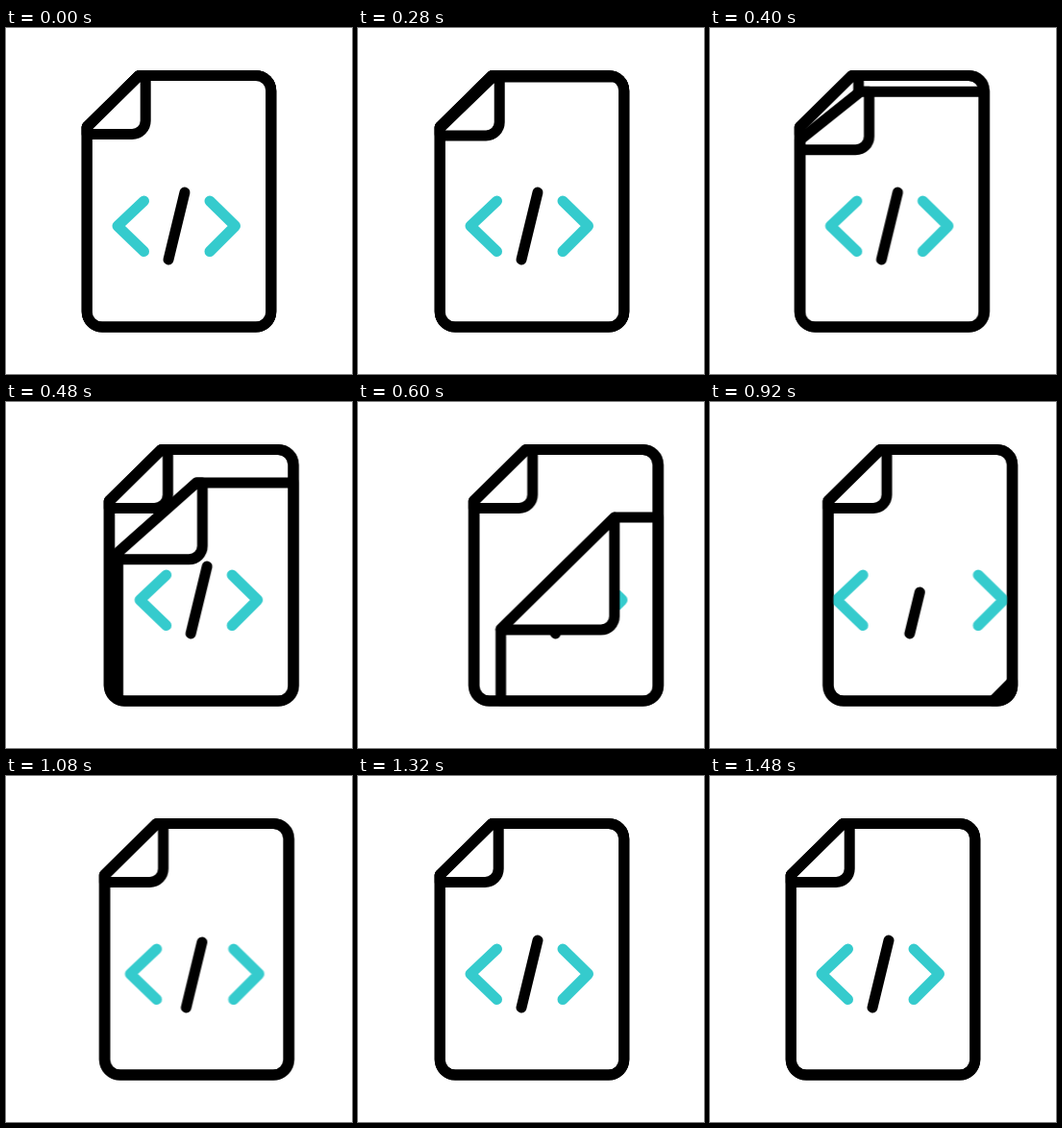
An HTML page without scripts that plays this animation: 360 by 360 pixels, repeating every 2000 ms.

```html
<!DOCTYPE html>
<html lang="en">
<head>
<meta charset="utf-8">
<title>Code page turning</title>
<style>
  html, body { margin: 0; width: 100%; height: 100%; overflow: hidden; background: #fff; }
  svg { display: block; width: 100vw; height: 100vh; }

  .line { fill: none; stroke: #000; stroke-width: 11; stroke-linecap: round; stroke-linejoin: round; }
  .paper { fill: #fff; }
  .teal { stroke: #35cbcd; }

  .page, .sheet, .curl, .turning, .fresh, .slide, .draw { animation: 2s linear infinite; }

  /* whole document drifts right and back */
  .page { animation-name: drift; }
  @keyframes drift {
    0%, 10% { transform: translateX(0); animation-timing-function: cubic-bezier(.56, 0, .29, 1); }
    40% { transform: translateX(41px); animation-timing-function: cubic-bezier(.55, 0, .24, 1); }
    72%, 100% { transform: translateX(0); }
  }

  /* top sheet peels towards the bottom right corner */
  .sheet { animation-name: peel; }
  @keyframes peel {
    0%, 10% { d: path("M84.2 103 L138.5 49.5 H275.8 V311 H84.2 Z"); animation-timing-function: cubic-bezier(.6, 0, .85, .5); }
    20% { d: path("M84.2 116 L147 66 H275.8 V311 H84.2 Z"); animation-timing-function: cubic-bezier(.35, .2, .7, .7); }
    30% { d: path("M111 235.8 L230 118.7 H275.8 V311 H111 Z"); animation-timing-function: cubic-bezier(.25, .65, .5, 1); }
    46% { d: path("M255.5 311 L275.8 290.5 H275.8 V311 H255.5 Z"); }
    50%, 100% { d: path("M275.5 320 L285 310.5 H275.8 V311 H275.5 Z"); }
  }

  .curl { animation-name: curl; }
  @keyframes curl {
    0%, 10% { d: path("M84.2 103 L138.5 49.5 H145.2 V96.5 a14 14 0 0 1 -14 14 H84.2 Z"); animation-timing-function: cubic-bezier(.6, 0, .85, .5); }
    20% { d: path("M84.2 116 L147 66 H156 V112.5 a14 14 0 0 1 -14 14 H84.2 Z"); animation-timing-function: cubic-bezier(.35, .2, .7, .7); }
    30% { d: path("M111 235.8 L230 118.7 H230 V222.5 a14 14 0 0 1 -14 14 H111 Z"); animation-timing-function: cubic-bezier(.25, .65, .5, 1); }
    46% { d: path("M255.5 311 L275.8 290.5 H275.8 V297 a14 14 0 0 1 -14 14 H255.5 Z"); }
    50%, 100% { d: path("M275.5 320 L285 310.5 H285 V306 a14 14 0 0 1 -14 14 H275.5 Z"); }
  }

  .turning { animation-name: leave; animation-timing-function: step-end; }
  @keyframes leave { 0% { opacity: 1; } 50%, 100% { opacity: 0; } }

  /* new symbols: brackets slide in from the sides, slash grows upwards */
  .fresh { animation-name: enter; animation-timing-function: step-end; }
  @keyframes enter { 0% { opacity: 0; } 40%, 100% { opacity: 1; } }

  .slide { animation-name: slide; }
  .left { --side: -.82; }
  .right { --side: 1; }
  @keyframes slide {
    0%, 40% { transform: translateX(calc(var(--side) * 70px)); }
    46% { transform: translateX(calc(var(--side) * 28.5px)); animation-timing-function: cubic-bezier(.3, .5, .6, .9); }
    54% { transform: translateX(calc(var(--side) * 6.4px)); animation-timing-function: ease-out; }
    64%, 100% { transform: translateX(0); }
  }

  .draw { stroke-dasharray: 72 200; animation-name: draw; }
  @keyframes draw {
    0%, 39% { stroke-dashoffset: 72; }
    46% { stroke-dashoffset: 28; animation-timing-function: cubic-bezier(.3, .6, .6, 1); }
    54% { stroke-dashoffset: 2; }
    58%, 100% { stroke-dashoffset: 0; }
  }
</style>
</head>
<body>
<svg viewBox="0 0 360 360">
  <defs>
    <path id="outline" d="M84.2 103 L138.5 49.5 H259.8 a16 16 0 0 1 16 16 V295 a16 16 0 0 1 -16 16 H100.2 a16 16 0 0 1 -16 -16 Z"/>
    <path id="fold" d="M84.2 103 L138.5 49.5 H145.2 V96.5 a14 14 0 0 1 -14 14 H84.2 Z"/>
    <path id="less" d="M143.5 180 L116 206 L143.5 232.5"/>
    <path id="greater" d="M212 180 L238.5 206 L212 232.5"/>
    <path id="slash" d="M169 241 L186 171"/>
    <clipPath id="inPage"><rect x="78.7" y="44" width="202.6" height="272.5" rx="21.5"/></clipPath>
    <clipPath id="inSheet"><path class="sheet"/></clipPath>
  </defs>

  <g class="page">
    <use href="#outline" class="line paper"/>
    <use href="#fold" class="line paper"/>

    <g class="turning" clip-path="url(#inPage)">
      <path class="line paper sheet"/>
      <g clip-path="url(#inSheet)">
        <use href="#less" class="line teal"/>
        <use href="#greater" class="line teal"/>
        <use href="#slash" class="line"/>
      </g>
      <path class="line paper curl"/>
    </g>

    <g class="fresh" clip-path="url(#inPage)">
      <use href="#less" class="line teal slide left"/>
      <use href="#greater" class="line teal slide right"/>
      <use href="#slash" class="line draw"/>
    </g>

    <use href="#outline" class="line"/>
  </g>
</svg>
</body>
</html>
```
